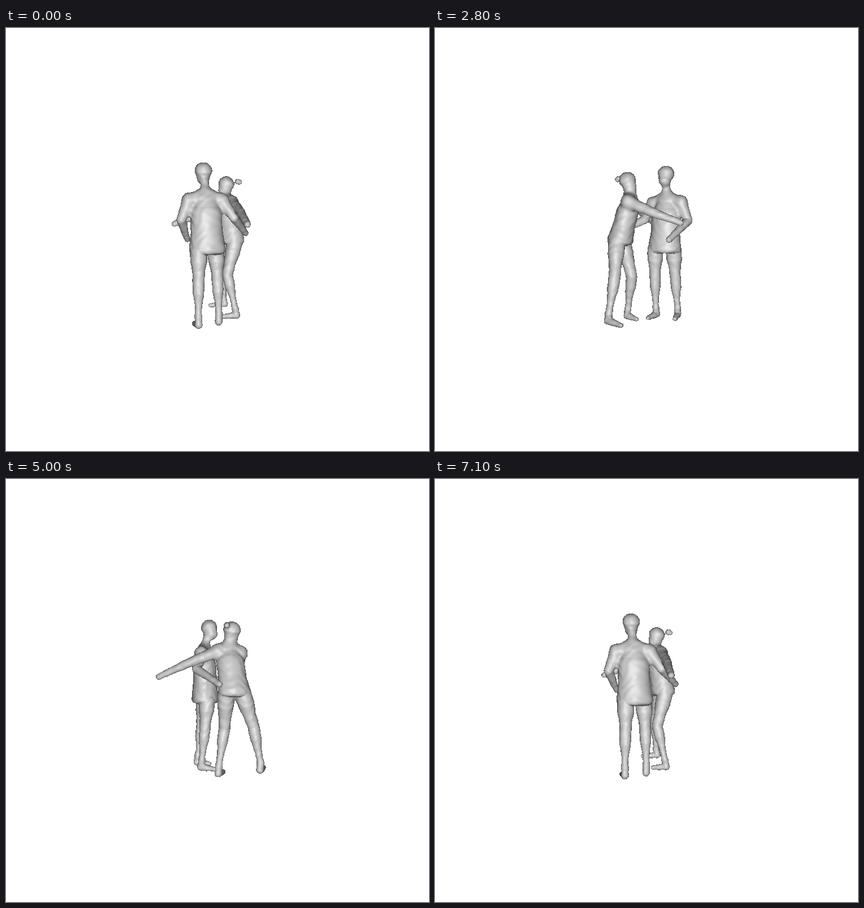
Recreate the animation shown at these times as an HTML page with a canvas. Size 748 by 748 pixels, loop 7200 ms.

```html
<!DOCTYPE html>
<html lang="en">
<head>
<meta charset="utf-8">
<title>Turntable</title>
<style>
  html, body { margin: 0; width: 100%; height: 100%; overflow: hidden; background: #fff; }
  canvas { display: block; }
</style>
</head>
<body>
<canvas id="stage" width="748" height="748"></canvas>
<script>
const LOOP = 7200, STEP = 100;
const EYE = 600, CX = 374, CY = 365;                 // camera distance and centre
const VIEW = { x: 255, y: 225, w: 240, h: 325 };     // part of the stage that is painted
const GRID = 2.5, LO = [-92, -130, -102], HI = [72, 162, 106];

const mix = (a, b, t) => a.map((v, i) => v + (b[i] - v) * t);
const add = (p, x, y, z) => [p[0] + x, p[1] + y, p[2] + z];

function blend(a, b, k) {
  const h = Math.max(k - Math.abs(a - b), 0);
  return Math.min(a, b) - h * h / (4 * k);
}

// Distance to a chain of tapered capsules; a node is [point, radius].
// k widens the cross-section along the yaw direction, cut trims below a height.
function chain(nodes, { k = 1, yaw = 0, cut } = {}) {
  const c = Math.cos(yaw), s = Math.sin(yaw), segs = [];
  const turned = nodes.map(([[x, y, z], r]) => ({ u: (x * c + z * s) / k, y, w: z * c - x * s, r }));
  turned.slice(1).forEach((b, i) => {
    const a = turned[i], du = b.u - a.u, dy = b.y - a.y, dw = b.w - a.w;
    segs.push({ a, du, dy, dw, dr: b.r - a.r, q: 1 / (du * du + dy * dy + dw * dw) });
  });
  return (x, y, z) => {
    const u = (x * c + z * s) / k, w = z * c - x * s;
    let best = 1e9;
    for (const { a, du, dy, dw, dr, q } of segs) {
      const pu = u - a.u, py = y - a.y, pw = w - a.w;
      const t = Math.max(0, Math.min(1, (pu * du + py * dy + pw * dw) * q));
      const eu = pu - du * t, ey = py - dy * t, ew = pw - dw * t;
      const d = Math.sqrt(eu * eu + ey * ey + ew * ew) - a.r - dr * t;
      if (d < best) best = d;
    }
    return cut === undefined ? best : -blend(-best, cut - y, 6);
  };
}

// Two bones through three joints, with a radius that depends on the way along.
function limb([a, b, c], radius) {
  const nodes = [];
  for (let i = 0; i <= 6; i++) {
    const p = i < 3 ? mix(a, b, i / 3) : mix(b, c, i / 3 - 1);
    nodes.push([p, radius(i / 6)]);
  }
  return chain(nodes);
}

const armRadius = t => 10.5 - 5.2 * t;
const legRadius = t => 14.5 - 9 * t + Math.sin(4 * Math.PI * t);

function foot(ankle, toe) {
  const heel = mix(toe, ankle, 1.1);
  heel[1] = toe[1] - 3;
  return chain([[ankle, 5.5], [heel, 6.5], [toe, 4]]);
}

// Joints come in left, right order; the trunk follows from shoulders and hips.
function person({ head, girth, arms, legs, toes, bun }) {
  const [left, right] = arms.map(a => a[0]);
  const top = mix(left, right, 0.5), base = mix(legs[0][0], legs[1][0], 0.5);
  const yaw = Math.atan2(right[2] - left[2], right[0] - left[0]);
  const face = [Math.sin(yaw), -Math.cos(yaw)];
  const chin = add(head, face[0] * 5, 11, face[1] * 5), nape = add(top, 0, -13, 0);
  const trunk = (t, r) => [mix(top, base, t), r * girth];

  const groups = [
    [
      chain([trunk(0, 0.7), trunk(0.25, 0.93), trunk(0.6, 0.93), trunk(0.95, 1.08)],
        { k: 1.25, yaw, cut: base[1] + 5 }),
      chain([[add(left, 0, -2, 0), 9], [nape, 9], [add(right, 0, -2, 0), 9]]),
      chain([[mix(head, nape, 0.5), 7], [nape, 8]]),
      chain([[head, 15], [chin, 10.5]]),
      ...arms.map(a => limb(a, armRadius))
    ],
    [...legs.map(l => limb(l, legRadius)), ...legs.map((l, i) => foot(l[2], toes[i]))]
  ];
  if (bun) groups.push([chain([[bun, 5.5], [add(bun, 3, 1, -1), 5]])]);

  return (x, y, z) => {
    let d = 1e9;
    groups.forEach((parts, i) => {
      let e = 1e9;
      for (const part of parts) e = blend(e, part(x, y, z), i ? 4 : 8);
      d = Math.min(d, e);
    });
    return d + 0.4 * Math.sin(x * 0.23 + 2 * Math.sin(y * 0.11)) * Math.sin(y * 0.27 + 2 * Math.sin(z * 0.17 + x * 0.1));
  };
}

const tall = person({
  head: [-24, -107, 25],
  girth: 23,
  arms: [
    [[-48, -56, 38], [-60, -24, 42], [-54, 9, -7]],
    [[8, -57, 28], [28, -28, 28], [52, -2, -22]]
  ],
  legs: [
    [[-31, 28, 39], [-31, 78, 44], [-31, 134, 51]],
    [[-3, 28, 21], [0, 78, 24], [2, 134, 29]]
  ],
  toes: [[-39, 149, 31], [0, 149, 4]]
});

const small = person({
  head: [16, -93, -32],
  girth: 20.5,
  arms: [
    [[26, -57, -9], [37, -38, 40], [45, -15, 92]],
    [[4, -55, -44], [-37, -36, -29], [-77, -19, -7]]
  ],
  legs: [
    [[32, 14, -27], [18, 73, -19], [32, 134, -14]],
    [[22, 13, -52], [11, 69, -68], [12, 128, -80]]
  ],
  toes: [[10, 149, -15], [-15, 142, -80]],
  bun: [38, -98, -30]
});

// Turn a distance field into quads (surface nets).
function polygonise(field) {
  const [nx, ny, nz] = LO.map((v, i) => Math.ceil((HI[i] - v) / GRID) + 1);
  const dy = nx, dz = nx * ny;
  const val = new Float32Array(dz * nz), id = new Int32Array(dz * nz).fill(-1);
  for (let k = 0; k < nz; k++) for (let j = 0; j < ny; j++) for (let i = 0; i < nx;) {
    const d = field(LO[0] + i * GRID, LO[1] + j * GRID, LO[2] + k * GRID);
    let run = Math.max(1, Math.floor((Math.abs(d) * 0.8 - 3) / GRID));
    const at = j * dy + k * dz;
    while (run-- && i < nx) val[at + i++] = d;
  }

  const corners = [], edges = [];
  for (let c = 0; c < 8; c++) {
    corners.push((c & 1) + (c >> 1 & 1) * dy + (c >> 2) * dz);
    for (const b of [1, 2, 4]) if (!(c & b)) edges.push([c, c | b]);
  }
  const verts = [], quads = [];
  for (let k = 0; k < nz - 1; k++) for (let j = 0; j < ny - 1; j++) for (let i = 0; i < nx - 1; i++) {
    const at = i + j * dy + k * dz;
    let n = 0, x = 0, y = 0, z = 0;
    for (const [a, b] of edges) {
      const va = val[at + corners[a]], vb = val[at + corners[b]];
      if (va < 0 === vb < 0) continue;
      const t = va / (va - vb), along = bit => ((a & bit) + ((b & bit) - (a & bit)) * t) / bit;
      x += along(1); y += along(2); z += along(4); n++;
    }
    if (!n) continue;
    id[at] = verts.length;
    verts.push(vertex(field, LO[0] + (i + x / n) * GRID, LO[1] + (j + y / n) * GRID, LO[2] + (k + z / n) * GRID));
  }

  const axes = [[1, dy, dz], [dy, 1, dz], [dz, 1, dy]];
  for (let at = dz + dy + 1; at < val.length - dz; at++) for (const [a, b, c] of axes) {
    if (val[at] < 0 === val[at + a] < 0) continue;
    const q = [id[at], id[at - b], id[at - b - c], id[at - c]];
    if (Math.min(...q) >= 0) quads.push(q);
  }
  return { verts, quads };
}

function vertex(f, x, y, z) {
  const e = 0.7;
  const gx = f(x + e, y, z) - f(x - e, y, z);
  const gy = f(x, y + e, z) - f(x, y - e, z);
  const gz = f(x, y, z + e) - f(x, y, z - e);
  const len = Math.hypot(gx, gy, gz) || 1;
  return { x, y, z, nx: gx / len, ny: gy / len, nz: gz / len, sx: 0, sy: 0, depth: 0, tone: 0 };
}

const meshes = [tall, small].map(polygonise);

const ctx = document.getElementById("stage").getContext("2d");
ctx.fillStyle = "#fff";
ctx.fillRect(0, 0, 748, 748);
const image = ctx.createImageData(VIEW.w, VIEW.h);
const pixels = new Uint32Array(image.data.buffer);
const zbuf = new Float32Array(VIEW.w * VIEW.h);

// Turn, project and light one vertex with a lamp at the eye.
function place(v, c, s) {
  const x = v.x * c + v.z * s, z = v.z * c - v.x * s;
  const nx = v.nx * c + v.nz * s, nz = v.nz * c - v.nx * s;
  const scale = EYE / (EYE - z);
  v.sx = CX + x * scale - VIEW.x;
  v.sy = CY + v.y * scale - VIEW.y;
  v.depth = z;
  const facing = Math.max(0, (-nx * x - v.ny * v.y + nz * (EYE - z)) / Math.hypot(x, v.y, EYE - z));
  v.tone = 42 + 165 * Math.pow(facing, 0.85) + 28 * Math.pow(facing, 40);
}

function triangle(a, b, c) {
  const area = (b.sx - a.sx) * (c.sy - a.sy) - (b.sy - a.sy) * (c.sx - a.sx);
  if (Math.abs(area) < 1e-6) return;
  const x0 = Math.max(0, Math.ceil(Math.min(a.sx, b.sx, c.sx) - 0.5));
  const x1 = Math.min(VIEW.w - 1, Math.floor(Math.max(a.sx, b.sx, c.sx) - 0.5));
  const y0 = Math.max(0, Math.ceil(Math.min(a.sy, b.sy, c.sy) - 0.5));
  const y1 = Math.min(VIEW.h - 1, Math.floor(Math.max(a.sy, b.sy, c.sy) - 0.5));
  for (let y = y0; y <= y1; y++) for (let x = x0; x <= x1; x++) {
    const px = x + 0.5 - a.sx, py = y + 0.5 - a.sy;
    const u = (px * (c.sy - a.sy) - py * (c.sx - a.sx)) / area;
    const v = (py * (b.sx - a.sx) - px * (b.sy - a.sy)) / area;
    const w = 1 - u - v;
    if (u < -1e-6 || v < -1e-6 || w < -1e-6) continue;
    const depth = a.depth * w + b.depth * u + c.depth * v, at = y * VIEW.w + x;
    if (depth <= zbuf[at]) continue;
    zbuf[at] = depth;
    const tone = Math.min(250, a.tone * w + b.tone * u + c.tone * v) | 0;
    pixels[at] = (0xff000000 | tone * 0x010101) >>> 0;
  }
}

function draw(angle) {
  const c = Math.cos(angle), s = Math.sin(angle);
  pixels.fill(0xffffffff);
  zbuf.fill(-1e9);
  for (const { verts, quads } of meshes) {
    for (const v of verts) place(v, c, s);
    for (const [i, j, k, l] of quads) {
      triangle(verts[i], verts[j], verts[k]);
      triangle(verts[i], verts[k], verts[l]);
    }
  }
  ctx.putImageData(image, VIEW.x, VIEW.y);
}

let shown = -1;
function tick() {
  const step = Math.floor(performance.now() % LOOP / STEP);
  if (step !== shown) {
    shown = step;
    draw(step * STEP / LOOP * 2 * Math.PI);
  }
  requestAnimationFrame(tick);
}
tick();
</script>
</body>
</html>
```
